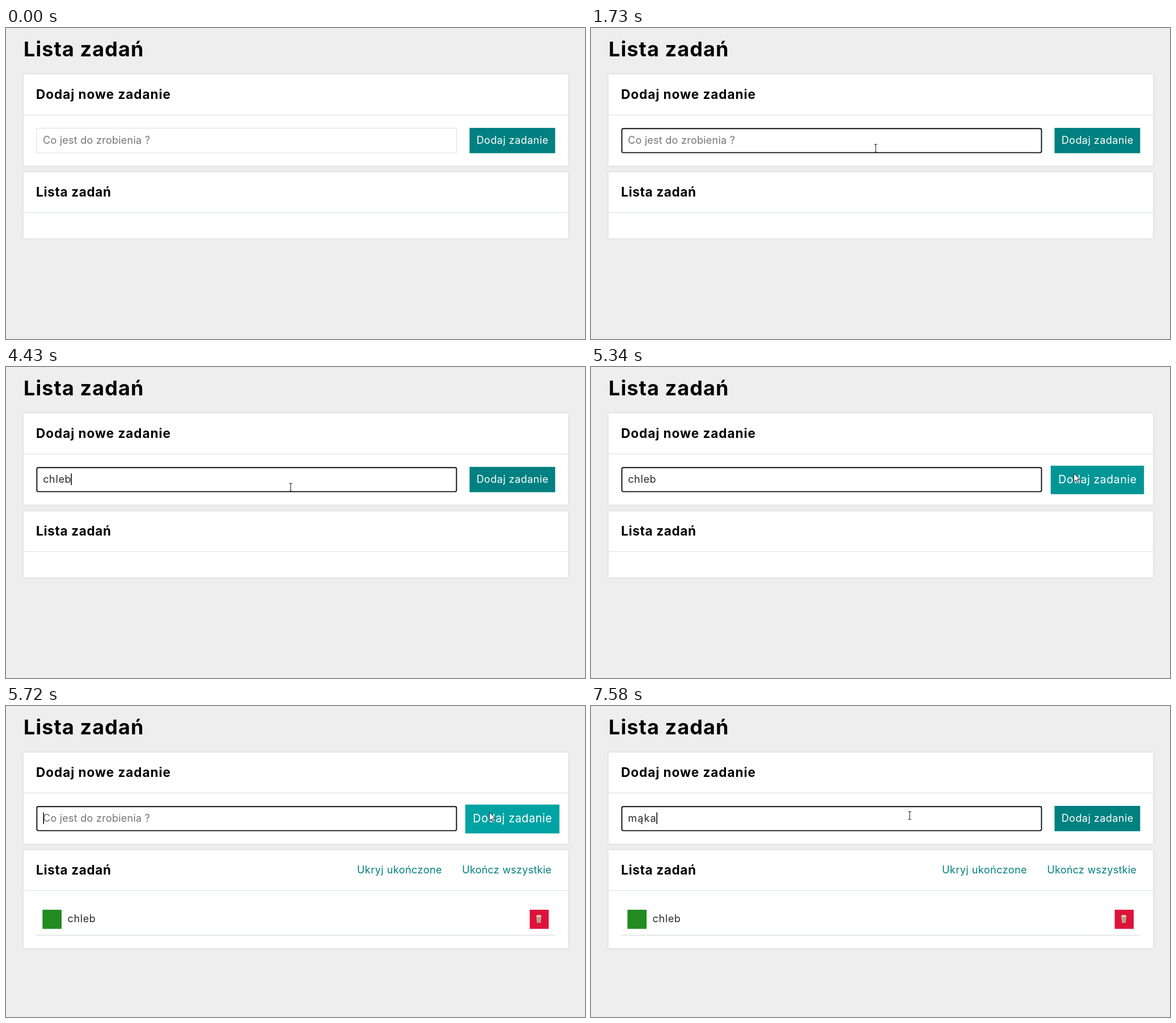
An HTML page for the animation above (8 s loop, 1021 by 548 pixels).

```html
<!DOCTYPE html>
<html lang="pl">
<head>
<meta charset="utf-8">
<title>Lista zadań</title>
<style>
html, body { margin: 0; width: 100%; height: 100%; overflow: hidden; background: #eee; }
svg { display: block; width: 1021px; height: 548px; }
text { font: 400 18px Inter, "Open Sans", sans-serif; font-optical-sizing: none; letter-spacing: .026em; white-space: pre; }
.h1 { font-size: 36px; font-weight: 700; letter-spacing: .03em; }
.h2 { font-size: 22.5px; font-weight: 700; letter-spacing: .03em; }
.wide { letter-spacing: .043em; }
.tight { letter-spacing: .014em; }
.task { fill: #2a2a2a; letter-spacing: .036em; }
.panel { fill: #fff; filter: drop-shadow(0 0 2px #d4d4d4); }
.line { fill: #dae0e0; }
.link { fill: teal; }
</style>
</head>
<body>
<svg viewBox="0 0 1021 548">
  <text class="h1" x="31" y="50">Lista zadań</text>

  <rect class="panel" x="31" y="82" width="960" height="160.5"/>
  <text class="h2 wide" x="53" y="125">Dodaj nowe zadanie</text>
  <rect class="line" x="31" y="152.6" width="960" height="1"/>

  <rect id="border" x="53.8" y="176.5" width="741" height="43.5" fill="#fff" stroke="#ddd"/>
  <rect id="focus" x="54.4" y="177.2" width="740" height="42.4" rx="2.5" fill="#fff" stroke="#101010" stroke-width="1.9"/>
  <text id="hint" class="tight" x="65" y="203.5" fill="#757575">Co jest do zrobienia ?</text>
  <text id="typed" class="task" x="65.2" y="203.5"></text>
  <rect id="caret" y="187.5" width="1.5" height="20.5"/>

  <g id="button">
    <rect id="face" x="-75.5" y="-22.3" width="151" height="44.6"/>
    <text x=".3" y="5.2" fill="#fff" text-anchor="middle">Dodaj zadanie</text>
  </g>

  <rect id="list" class="panel" x="31" y="254.2" width="960"/>
  <text class="h2" x="53" y="297">Lista zadań</text>
  <rect class="line" x="31" y="324.8" width="960" height="1"/>

  <g id="item">
    <text class="link" x="619" y="294.5">Ukryj ukończone</text>
    <text class="link tight" x="804.3" y="294.5">Ukończ wszystkie</text>
    <rect x="64.3" y="359" width="33.7" height="33.7" fill="#228b22"/>
    <text class="task" x="108.5" y="381">chleb</text>
    <rect x="923.5" y="359" width="33.5" height="33.7" fill="#dc143c"/>
    <path d="M935.3 370.5h8.4l-1 11.5h-6.4z" fill="#cdbfae"/>
    <path d="M937.5 372l.5 9M939.5 372v9M941.5 372l-.5 9" stroke="#a4604f" stroke-width=".7"/>
    <ellipse cx="939.5" cy="370" rx="4.7" ry="1.7" fill="#f0e2cc" stroke="#a98b78" stroke-width=".6"/>
    <rect class="line" x="53" y="403.2" width="915" height="1.4"/>
  </g>

  <path id="arrow" d="M.5 .5v14.6l3.4-3.2 2.3 5.2 2.3-1-2.3-5.1h4.4z" fill="#fff" stroke="#222"/>
  <path id="beam" d="M-3-7h2.2l.8.8.8-.8H3M0-6.4V6.4M-3 7h2.2l.8-.8.8.8H3" fill="none" stroke="#333" stroke-width="1.2"/>
</svg>
<script>
const LOOP = 8000;
const $ = id => document.getElementById(id);
const clamp = v => Math.max(0, Math.min(1, v));
const show = (id, on) => $(id).style.display = on ? '' : 'none';

// time, typed text, caret x (0 while blinked off)
const typing = [
  [0, '', 0], [1190, '', 65.5], [1730, '', 0],
  [2180, 'c', 75.7], [2400, 'ch', 86.7], [2800, 'chl', 91.4], [3060, 'chle', 102.7], [3370, 'chleb', 114.4],
  [3870, 'chleb', 0], [4430, 'chleb', 114.4], [4930, 'chleb', 0], [5430, 'chleb', 114.4],
  [5720, '', 65.5], [6220, '', 0],
  [6680, 'm', 84.3], [7130, 'mą', 94.7], [7410, 'mąk', 104.5], [7580, 'mąka', 115.4]
];

// time, pointer x, pointer y
const path = [
  [60, 872, 540], [160, 765, 425], [270, 628, 318], [390, 530, 248], [500, 501, 225],
  [740, 501, 225], [1000, 501, 212], [1449, 501, 212], [1450, 502, 212],
  [4760, 502, 212], [4870, 585, 180], [4970, 740, 145], [5030, 822, 138],
  [5130, 843, 175], [5260, 851, 187], [5610, 851, 187], [5620, 852, 187],
  [5770, 852, 187], [5870, 800, 185], [5970, 680, 187], [6110, 580, 192], [6220, 562, 193]
];

const last = (rows, t) => rows.findLastIndex(r => r[0] <= t);

function pointer(t) {
  const i = last(path, t), a = path[i], b = path[i + 1] || a;
  const p = b === a ? 0 : (t - a[0]) / (b[0] - a[0]);
  return [a[1] + (b[1] - a[1]) * p, a[2] + (b[2] - a[2]) * p];
}

function ease(t, start, length) {
  const p = clamp((t - start) / length);
  return 1 - (1 - p ** 1.2) ** 2.7;
}

function draw(t) {
  const [, text, caret] = typing[last(typing, t)];
  const focused = t >= 1190, added = t >= 5720;
  show('border', !focused);
  show('focus', focused);
  show('hint', !text);
  show('caret', caret);
  $('caret').setAttribute('x', caret);
  $('typed').textContent = text;
  $('typed').style.letterSpacing = added ? '.065em' : '';

  show('item', added);
  $('list').setAttribute('height', added ? 172.5 : 116.3);

  const hover = ease(t, 5060, 450) - ease(t, 5870, 430);
  const press = clamp((t - 5610) / 100) - clamp((t - 5730) / 150);
  const shade = 128 + 25 * hover + 10 * press;
  $('button').setAttribute('transform',
    `translate(892.9 ${198.3 + .8 * hover}) scale(${1 + .1 * hover} ${1 + .14 * hover})`);
  $('face').setAttribute('fill', `rgb(0 ${shade} ${shade})`);

  const visible = t >= 60;
  const [x, y] = visible ? pointer(t) : [0, 0];
  const inField = x > 53 && x < 795 && y > 176 && y < 220;
  show('arrow', visible && !inField);
  show('beam', visible && inField);
  for (const id of ['arrow', 'beam']) $(id).setAttribute('transform', `translate(${x} ${y})`);
}

const start = performance.now();
function tick() {
  draw((performance.now() - start) % LOOP);
  requestAnimationFrame(tick);
}
tick();
</script>
</body>
</html>
```
